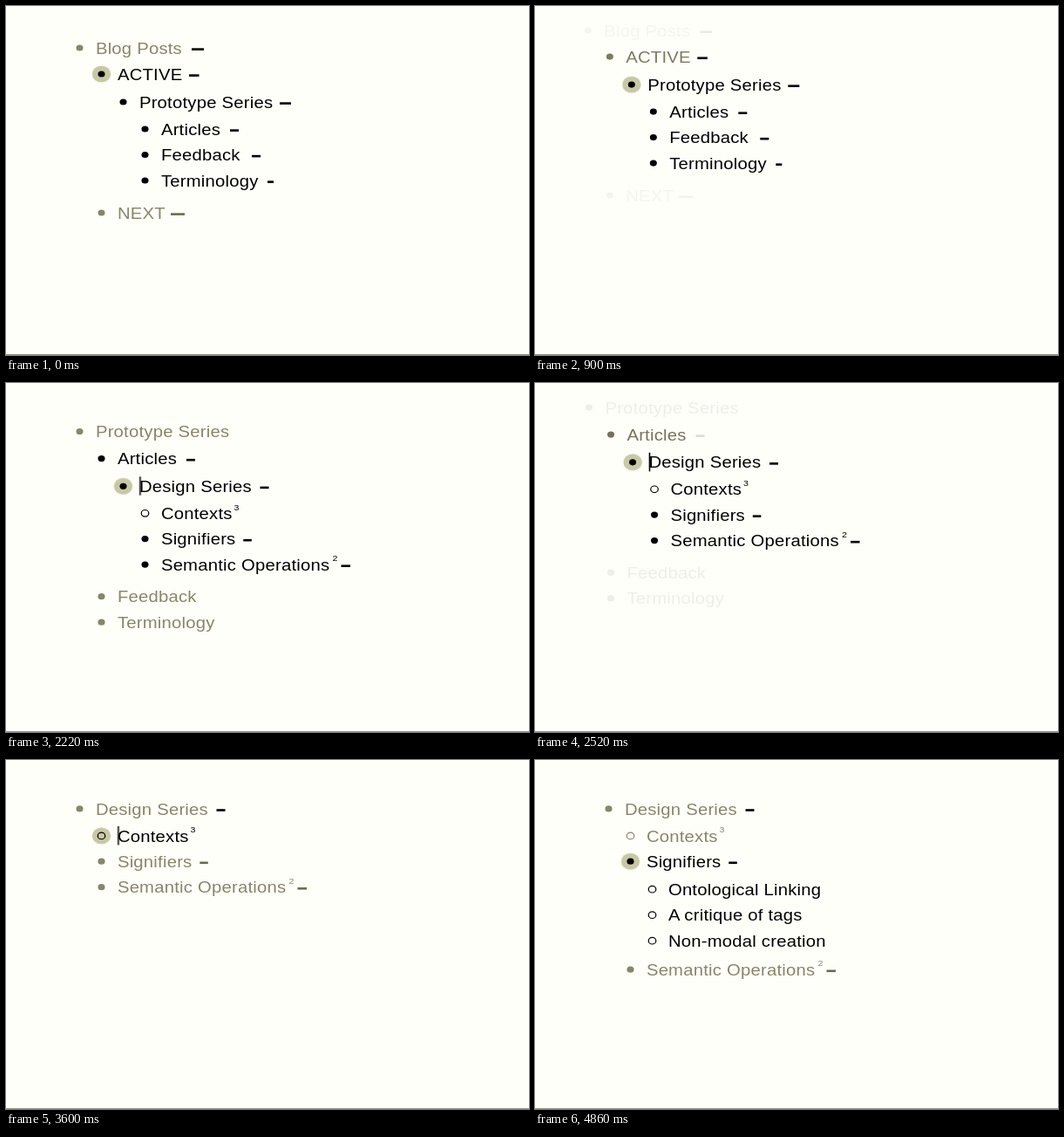
An HTML page for the animation above (6.86 s loop, 600 by 400 pixels).

```html
<!DOCTYPE html>
<html lang="en">
<head>
<meta charset="utf-8">
<title>Outline</title>
<style>
  html, body { margin: 0; width: 100%; height: 100%; overflow: hidden; background: #fffffa; }
  svg { display: block; width: 100vw; height: 100vh; }
  text { font: 18.1px "Liberation Sans", Arial, sans-serif; letter-spacing: .2px; fill: currentColor; }
  .sup { font-size: 9.5px; letter-spacing: 0; }
  .dot { fill: currentColor; }
  .ring { fill: none; stroke: currentColor; stroke-width: 1.1; }
  .halo { fill: #c8c8a6; opacity: 0; }
  .caret { fill: #000; opacity: 0; }
  .dash { fill: currentColor; }
  .edge { fill: #90908a; }
</style>
</head>
<body>
<!-- The whole stage is 1.12 times wider than its drawing units -->
<svg viewBox="0 0 535.714 400" preserveAspectRatio="none">
  <g id="list"></g>
  <rect class="edge" y="399" width="536" height="1"/>
</svg>
<script>
const LOOP = 6860, FADE = 460, MOVE = 420;
const K = 1.12, LEFT = 84.5, INDENT = 25;
const ON = '#000', DIM = '#86866a', MID = '#6b6b50', OFF = 'rgba(134,134,106,0)';

const list = document.getElementById('list');

function add(parent, tag, attrs, text = '') {
  const el = document.createElementNS('http://www.w3.org/2000/svg', tag);
  for (const name in attrs) el.setAttribute(name, attrs[name]);
  el.textContent = text;
  parent.append(el);
  return el;
}

// steps: [start in ms, value, duration]
function track(el, prop, first, steps = []) {
  const frames = [{ offset: 0, [prop]: first }];
  let last = first;
  for (const [at, value, time = 0] of steps) {
    frames.push({ offset: at / LOOP, [prop]: last, easing: 'ease' });
    frames.push({ offset: Math.min(1, (at + time) / LOOP), [prop]: value });
    last = value;
  }
  frames.push({ offset: 1, [prop]: last });
  el.animate(frames, { duration: LOOP, iterations: Infinity });
}

const shift = (x, y) => `translate(${x / K}px, ${y}px)`;
const fade = (at, value) => [at, value, FADE];

function show(el, from, to) {
  const steps = [];
  if (from > 0) steps.push([from, 1]);
  if (to < LOOP) steps.push([to, 0]);
  track(el, 'opacity', from > 0 ? 0 : 1, steps);
}

function row(r) {
  const g = add(list, 'g', {});
  const x = LEFT + INDENT * r.level;
  if (r.jump) track(g, 'transform', shift(x, r.y), [[r.jump[0], shift(x, r.y + r.jump[1])]]);
  else g.style.transform = shift(x, r.y);

  if (r.focus) show(add(g, 'circle', { class: 'halo', r: 9.6 }), ...r.focus);

  const body = add(g, 'g', {});
  add(body, 'circle', r.open ? { class: 'ring', r: 3.8 } : { class: 'dot', r: 3.6 });
  add(body, 'text', { x: 18.4 / K, y: 6.7 }, r.text);
  if (r.sup) add(body, 'text', { class: 'sup', x: r.sup[1] / K, y: -3.8 }, r.sup[0]);
  track(body, 'color', ...r.ink);

  if (r.dash) {
    const [start, width, ...ink] = r.dash;
    const dash = add(g, 'rect', { class: 'dash', x: start / K, y: .3, width: width / K, height: 2.6 });
    track(dash, 'color', ...ink);
  }
  if (r.caret) {
    const caret = add(g, 'rect', { class: 'caret', x: 18.6 / K, y: -11, width: 1.6 / K, height: 21.5 });
    show(caret, ...r.caret);
  }
}

const T1 = 600, T2 = 1320, T3 = 2260, T4 = 3012, T5 = 3960;
const GROW = 1370;
const later = (...steps) => [OFF, [[GROW, ON], ...steps]];
const child = [OFF, [[T5, ON, 160]]];

[
  { text: 'Blog Posts', level: 0, y: 48, ink: [DIM, [fade(T1, OFF)]],
    dash: [128.5, 14, ON, [fade(T1, OFF)]] },
  { text: 'ACTIVE', level: 1, y: 78, ink: [ON, [fade(T1, DIM), fade(T2, OFF)]],
    dash: [100.5, 11.5, ON, [[T2, OFF, 300]]], focus: [0, T1], caret: [300, T1] },
  { text: 'Prototype Series', level: 2, y: 110, ink: [ON, [fade(T2, DIM), fade(T3, OFF)]],
    dash: [179.5, 13, ON, [[1540, OFF, 340]]], focus: [T1, T2], caret: [T1, 840] },
  { text: 'Articles', level: 3, y: 141, ink: [ON, [fade(T3, DIM), fade(T4, OFF)]],
    dash: [97.5, 10, ON, [fade(T3, OFF)]], focus: [T2, 2040], caret: [T2, 2040] },
  { text: 'Design Series', level: 4, y: 172.7, ink: later(fade(3100, DIM)),
    dash: [157, 10, ...later()], focus: [2040, 2760], caret: [2040, 2760] },
  { text: 'Contexts', level: 5, y: 203.7, open: true, sup: ['3', 102], ink: later(fade(T5, DIM)),
    focus: [2760, T5], caret: [2760, T5] },
  { text: 'Signifiers', level: 5, y: 233, ink: later(fade(3100, DIM), fade(T5, ON)),
    dash: [112.8, 9.5, ...later(fade(2760, MID), fade(T5, ON))], focus: [T5, LOOP], caret: [T5, 4480] },
  { text: 'Ontological Linking', level: 6, y: 265, open: true, ink: child },
  { text: 'A critique of tags', level: 6, y: 294.5, open: true, ink: child },
  { text: 'Non-modal creation', level: 6, y: 324, open: true, ink: child },
  { text: 'Semantic Operations', level: 5, y: 262.5, jump: [T5, 94.5], sup: ['2', 215],
    ink: later(fade(3100, DIM)), dash: [225, 10.5, ...later(fade(2760, MID))] },
  { text: 'Feedback', level: 3, y: 170.5, jump: [GROW, 128.6], ink: [ON, [fade(T2, DIM), fade(T3, OFF)]],
    dash: [122.5, 10, ON, [[T2, OFF, 540]]] },
  { text: 'Terminology', level: 3, y: 200, jump: [GROW, 128.6], ink: [ON, [fade(T2, DIM), fade(T3, OFF)]],
    dash: [140.5, 7, ON, [[T2, OFF, 540]]] },
  { text: 'NEXT', level: 1, y: 237, ink: [DIM, [fade(T1, OFF)]],
    dash: [79.5, 16, MID, [fade(T1, OFF)]] },
].forEach(row);

// The outline slides one level left and up at each zoom
track(list, 'transform', shift(0, 0), [
  [T1, shift(-25, -21), MOVE],
  [T2, shift(-50, -54.4), MOVE],
  [T3, shift(-75, -85), MOVE],
  [T4, shift(-100, -116.8), MOVE],
]);
</script>
</body>
</html>
```
